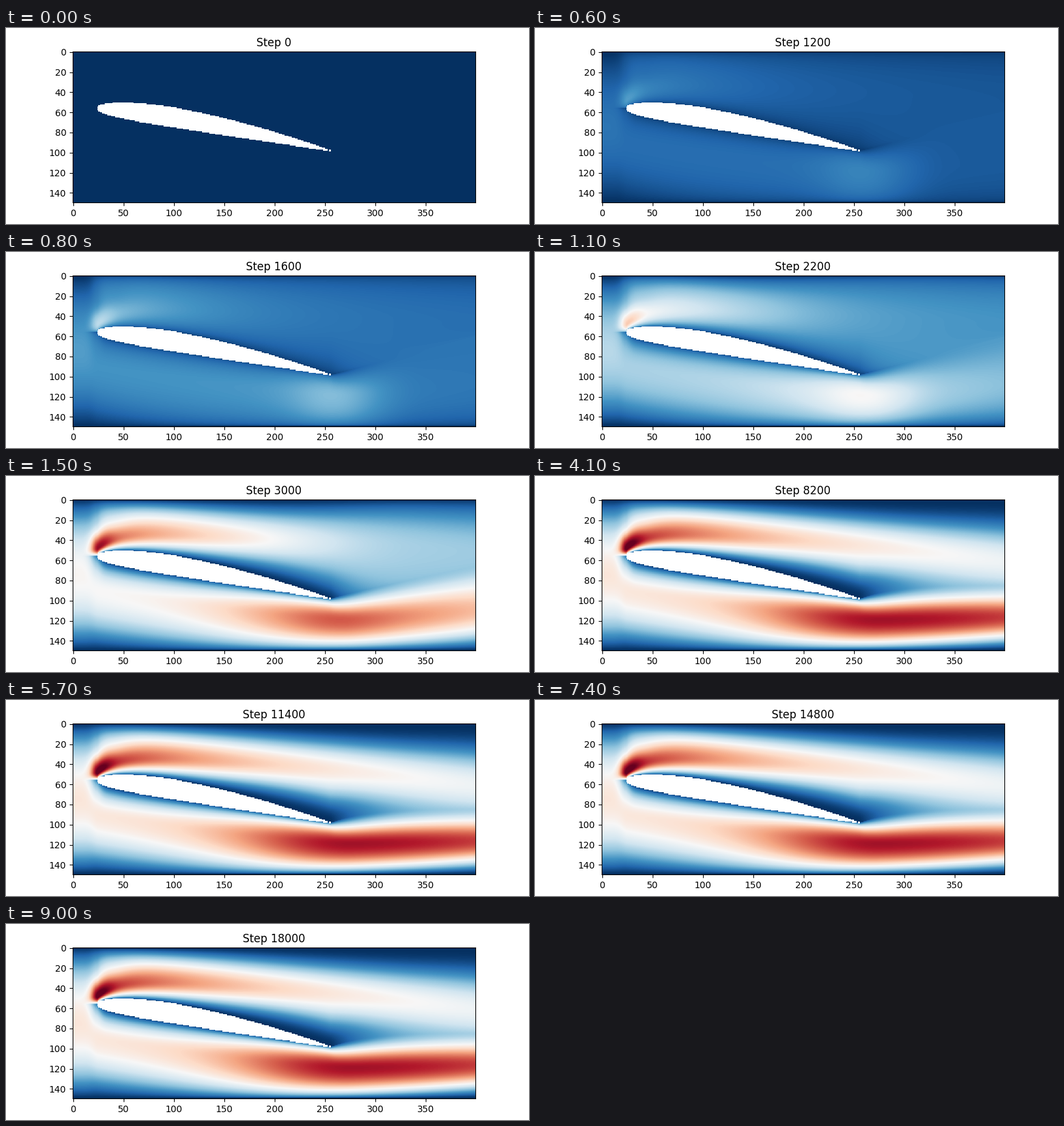
Recreate the animation shown at these times as a matplotlib script. Size 800x300 px, loop 9.1 s.

```python
import numpy as np
import matplotlib.pyplot as plt
from matplotlib.animation import FuncAnimation

W, H = 400, 150
FRAMES, STEPS = 91, 200
NOSE, TAIL = np.array([24.2, 55.5]), np.array([256.0, 98.2])
CAMBER, CAMBER_AT, THICK = 0.019, 0.4, 0.079

x = np.arange(W, dtype=float)
X, Y = np.meshgrid(x, np.arange(H, dtype=float))


# ---- wing section -------------------------------------------------------
def section(c):
    """Camber line and half thickness at chord fraction c."""
    p = CAMBER_AT
    line = np.where(c < p,
                    CAMBER / p**2 * (2 * p * c - c**2),
                    CAMBER / (1 - p)**2 * (1 - 2 * p + 2 * p * c - c**2))
    half = 5 * THICK * (0.2969 * np.sqrt(c) - 0.126 * c - 0.3516 * c**2
                        + 0.2843 * c**3 - 0.1036 * c**4)
    return line, half


chord = np.hypot(*(TAIL - NOSE))
ca, sa = (TAIL - NOSE) / chord


def surface(side):
    """Height of one wing surface for every column."""
    c = np.linspace(0, 1, 800)**2
    line, half = section(c)
    n = line + side * half
    px = NOSE[0] + chord * (c * ca + n * sa)
    py = NOSE[1] + chord * (c * sa - n * ca)
    return np.interp(x, np.maximum.accumulate(px), py)


along = ((X - NOSE[0]) * ca + (Y - NOSE[1]) * sa) / chord
across = ((X - NOSE[0]) * sa - (Y - NOSE[1]) * ca) / chord
line, half = section(np.clip(along, 0, 1))
wing = (along >= 0) & (along <= 1) & (np.abs(across - line) <= half)
top, bottom = surface(1), surface(-1)


# ---- flow ---------------------------------------------------------------
def ease(s):
    s = np.clip(s, 0, 1)
    return s * s * (3 - 2 * s)


def bell(center, width):
    return np.exp(-((x - center) / width)**2)


def rise(s, power):
    """Speed growing from a wall (s = 0) to the core of a stream (s = 1)."""
    return np.sin(np.pi / 2 * np.clip(s, 0, 1))**power


def mix(early, late, d):
    return early + (late - early) * d


def settle(t, lag, start):
    """How far each column has gone from the starting to the steady flow."""
    delay = lag * ease((x - start) / 250)
    return 1 / (1 + np.exp(-(t - 2300 - delay) / 350))


past_nose = np.maximum(x - NOSE[0], 0)
past_tail = np.maximum(x - TAIL[0], 0)
ahead, behind = x < NOSE[0], x > TAIL[0]

inlet = 0.56 * 4 * Y * (H - 1 - Y) / (H - 1)**2
near_nose = np.exp(-(np.maximum(25 - X, 0) / 8)**2)
nose_slow = 0.15 * np.exp(-(past_nose / 5)**2)


def stream_above(d, edge, slow):
    peak = mix(0.30 + 0.48 * np.exp(-past_nose / 100),
               0.40 + 0.50 * np.exp(-past_nose / 200), d)
    peak = peak + 0.15 * bell(27, 12)
    core = 31 + mix(18, 30, d) * (x / W)**1.7 + 17 * np.exp(-past_nose / 20)
    wall = mix(0.3, 0.8 + 1.4 * ease(x / 350), d)
    skin = mix(0.4, 0.8 + 1.3 * bell(240, 110), d)
    tight = 0.5 * np.exp(-past_nose / 25)
    s = Y / core
    outer = peak * mix(rise(s, wall), rise(s, 10), tight)
    inner = mix(slow, peak, rise((edge - Y) / (edge - core), skin))
    return np.where(s < 1, outer, inner)


def stream_below(d, bend, edge, slow):
    start = 0.5 - 0.17 * ease((x - 230) / 120) + 0.22 * bell(262, 45)
    steady = 0.55 + 0.37 * bell(275, np.where(x < 275, 120, 270))
    peak = mix(start, steady, d)
    core = (119 - 33 * np.maximum(1 - x / 275, 0)**1.5
            - bend * np.maximum(x / 275 - 1, 0)**1.3 * 2.5)
    wall = mix(0.25 + 0.8 * np.exp(-x / 50), 0.6 + 0.6 * (x / 200 - 1)**2, d)
    skin = mix(0.35, 0.8 - 0.25 * np.minimum(x / 250, 1), d)
    skin = skin + 1.2 * (1 - np.exp(-past_tail / 25))
    outer = peak * rise((H - 1 - Y) / (H - 1 - core), wall)
    inner = mix(slow, peak, rise((Y - edge) / (core - edge), skin))
    return np.where(Y > core, outer, inner)


def speed(t):
    ramp = np.sin(np.pi * min(t, 3700) / 7400)**2
    d_above, d_below = settle(t, 1100, 100), settle(t, 350, 200)

    # The wake starts out rising behind the tail, then levels off.
    wake_y = TAIL[1] - mix(0.27 * past_tail,
                           14 * (1 - np.exp(-past_tail / 35)), d_above)
    wake_v = mix(0.34 * (1 - np.exp(-past_tail / 20)),
                 0.36 * (1 - np.exp(-past_tail / 55)), d_above)
    upper, lower = (np.where(behind, wake_y, np.where(ahead, 56, side))
                    for side in (top, bottom))
    slow = nose_slow + wake_v

    flow = np.where(Y < (upper + lower) / 2,
                    stream_above(d_above, upper, slow),
                    stream_below(d_below, mix(13, 3, d_above), lower, slow))
    flow = mix(inlet, flow, near_nose)
    flow[[0, -1]] = 0
    return np.where(wing, np.nan, ramp * flow)


# ---- figure -------------------------------------------------------------
fig, ax = plt.subplots(figsize=(8, 3), dpi=100)
image = ax.imshow(speed(0), cmap="RdBu_r", vmin=0, vmax=1)
title = ax.set_title("Step 0")


def update(i):
    t = i * STEPS
    image.set_data(speed(t))
    title.set_text(f"Step {t}")
    return image, title


anim = FuncAnimation(fig, update, frames=FRAMES, interval=100, repeat=True,
                     repeat_delay=0, blit=False)
plt.show()
```
